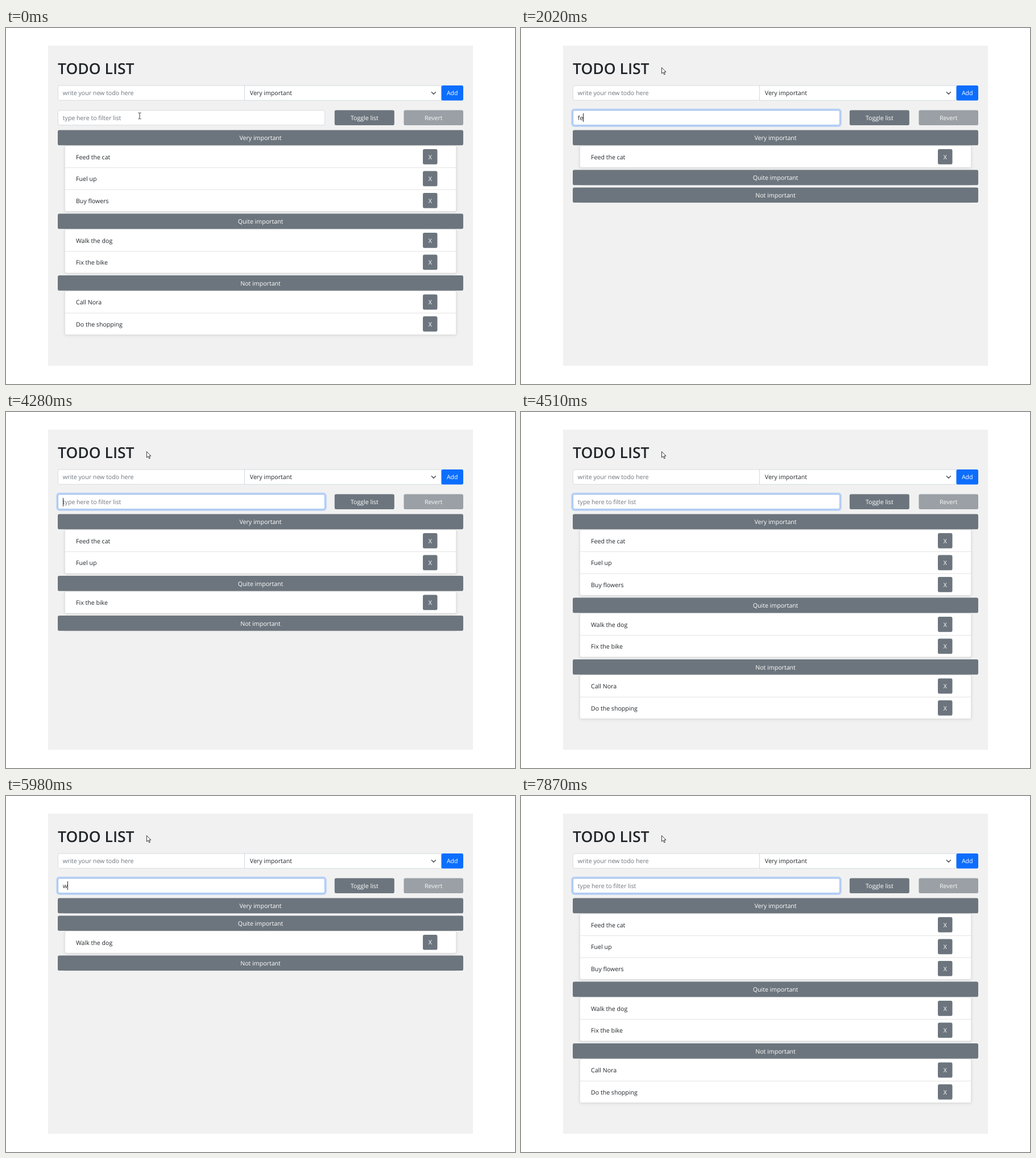
Animation, 895 px wide and 626 px high, one loop 8000 ms. Source, as an HTML page:

```html
<!DOCTYPE html>
<html lang="en">
<head>
<meta charset="utf-8">
<title>Todo list</title>
<style>
  html, body { margin: 0; width: 100%; height: 100%; overflow: hidden; background: #fff; }
  svg { display: block; width: 895px; height: 626px; }
  text { font: 10.62px "Open Sans", "Noto Sans", sans-serif; fill: #212529; text-rendering: geometricPrecision; white-space: pre; }
  .title { font-size: 26.5px; font-weight: 600; }
  .mid { text-anchor: middle; }
  .light { fill: #fff; }
  .hint { fill: #6c757d; }
  .field { fill: #fff; stroke: #ced4da; stroke-width: .8; }
  .btn { fill: #6c757d; }
  .add { fill: #0d6efd; }
  .card { fill: #fff; stroke: #d4d5d6; stroke-width: .8; filter: drop-shadow(0 1.4px 2.8px rgba(0, 0, 0, .09)); }
  .rule { fill: #dcdcdc; }
</style>
</head>
<body>
<svg id="stage" viewBox="0 0 895 626"></svg>
<script>
const LOOP = 8000;
const ROW = 38.5, BAR = 26.6, GAP = 30.8;

const groups = [
  ["Very important", ["Feed the cat", "Fuel up", "Buy flowers"]],
  ["Quite important", ["Walk the dog", "Fix the bike"]],
  ["Not important", ["Call Nora", "Do the shopping"]]
];

// [start ms, typed text, caret visible]
const typing = [
  [0, "", 0], [70, "", 1], [620, "", 0], [1150, "", 1],
  [1320, "f", 1], [1850, "fe", 1], [2470, "fe", 0], [2950, "fe", 1], [3500, "fe", 0],
  [3730, "f", 0], [4050, "f", 1], [4280, "", 1], [4510, "", 0], [5060, "", 1], [5610, "", 0],
  [5830, "w", 1], [6310, "wa", 1], [6860, "wa", 0], [7240, "w", 0], [7320, "w", 1],
  [7470, "", 1], [7870, "", 0]
];

// [start ms, filter applied to the list]
const filters = [
  [0, ""], [1470, "f"], [2020, "fe"], [3880, "f"], [4430, ""], [5980, "w"], [7570, ""]
];

// [start ms, x, y, shape]
const pointer = [
  [0, 235, 154.5, "beam"], [230, 237, 147, "beam"], [310, 240, 128, "arrow"],
  [390, 243, 105, "beam"], [470, 246, 82, "arrow"], [540, 247, 69, "arrow"]
];

const focus = [[0, 0], [70, .5], [150, 1]];
const caretX = { "": 100, f: 103, fe: 109, w: 108, wa: 114 };

const at = (table, t) => table.findLast(step => step[0] <= t);
const box = (x, y, w, h, cls, r = 2.8) =>
  `<rect x="${x}" y="${y}" width="${w}" height="${h}" rx="${r}" class="${cls}"/>`;
const label = (x, y, str, cls = "") => `<text x="${x}" y="${y}" class="${cls}">${str}</text>`;
const button = (x, y, w, str, cls = "btn") =>
  box(x, y, w, BAR, cls) + label(x + w / 2, y + 17.5, str, "mid light");

function listMarkup(filter) {
  let y = 179.6, out = "";
  for (const [name, all] of groups) {
    const items = all.filter(s => s.toLowerCase().startsWith(filter));
    const n = items.length, top = y + 27.2;
    if (n) out += box(103.3, top, 688.5, n * ROW + .3, "card");
    else out += box(103.3, top - .8, 688.5, 1, "rule", 0);
    out += button(91, y, 713, name);
    items.forEach((item, i) => {
      const rowY = top + i * ROW;
      if (i) out += box(103.5, rowY, 688, .8, "rule", 0);
      out += label(123, rowY + 24, item) + button(733, rowY + 6.3, 25.5, "X");
    });
    y += GAP + (n ? n * ROW + .7 : 0);
  }
  return out;
}

const stage = document.getElementById("stage");
stage.innerHTML = `
  <rect x="74" y="31" width="747" height="563" fill="#f1f1f1"/>
  ${label(91, 81, "TODO LIST", "title")}
  ${box(91.4, 101.2, 328.4, 26, "field")}
  ${box(419.6, 101.2, 346.4, 26, "field", 0)}
  ${label(99.8, 118.3, "write your new todo here", "hint")}
  ${label(428.8, 118.3, "Very important")}
  <path d="M748.2 112.6l3.7 3.7 3.7-3.7" fill="none" stroke="#343a40" stroke-width="1.3" stroke-linecap="round" stroke-linejoin="round"/>
  ${button(765.5, 100.9, 38.5, "Add", "add")}
  <rect id="ring" x="89.7" y="143.1" width="472.6" height="29.4" rx="4.2" fill="none" stroke="#bcd3f4" stroke-width="2.8"/>
  ${box(91.4, 144.8, 469.2, 26, "field")}
  <rect id="edge" x="91.4" y="144.8" width="469.2" height="26" rx="2.8" fill="none" stroke="#86b7fe" stroke-width=".9"/>
  <text id="entry" x="99.8" y="162"></text>
  <rect id="caret" width="1" height="15" fill="#212529"/>
  ${button(577.8, 144.5, 105, "Toggle list")}
  <g opacity=".65">${button(699.5, 144.5, 104.5, "Revert")}</g>
  <g id="list"></g>
  <g id="pointer">
    <path id="beam" d="M-2.5-5.3h2l.5.5.5-.5h2M0-4.8v9.6M-2.5 5.3h2l.5-.5.5.5h2" fill="none" stroke="#222" stroke-width=".9"/>
    <path id="arrow" d="M.4.6v10.6l2.5-2.3 1.8 4 1.7-.8-1.8-3.8h3.3z" fill="#fff" stroke="#222" stroke-width=".9" stroke-linejoin="round"/>
  </g>`;

const el = {};
for (const id of ["ring", "edge", "entry", "caret", "list", "pointer", "beam", "arrow"])
  el[id] = document.getElementById(id);
const set = (id, name, value) => el[id].setAttribute(name, value);

let shown = null;
function draw(t) {
  const [, text, caret] = at(typing, t);
  el.entry.textContent = text || "type here to filter list";
  set("entry", "class", text ? "" : "hint");
  set("caret", "x", caretX[text]);
  set("caret", "y", text ? 150 : 151);
  set("caret", "opacity", caret);

  const glow = at(focus, t)[1];
  set("ring", "opacity", glow);
  set("edge", "opacity", glow);

  const [, x, y, shape] = at(pointer, t);
  set("pointer", "transform", `translate(${x} ${y})`);
  for (const id of ["beam", "arrow"]) set(id, "opacity", id === shape ? 1 : 0);

  const filter = at(filters, t)[1];
  if (filter !== shown) {
    el.list.innerHTML = listMarkup(filter);
    shown = filter;
  }
}

const start = performance.now();
function tick(now) {
  draw(Math.max(0, now - start) % LOOP);
  requestAnimationFrame(tick);
}
draw(0);
requestAnimationFrame(tick);
</script>
</body>
</html>
```
